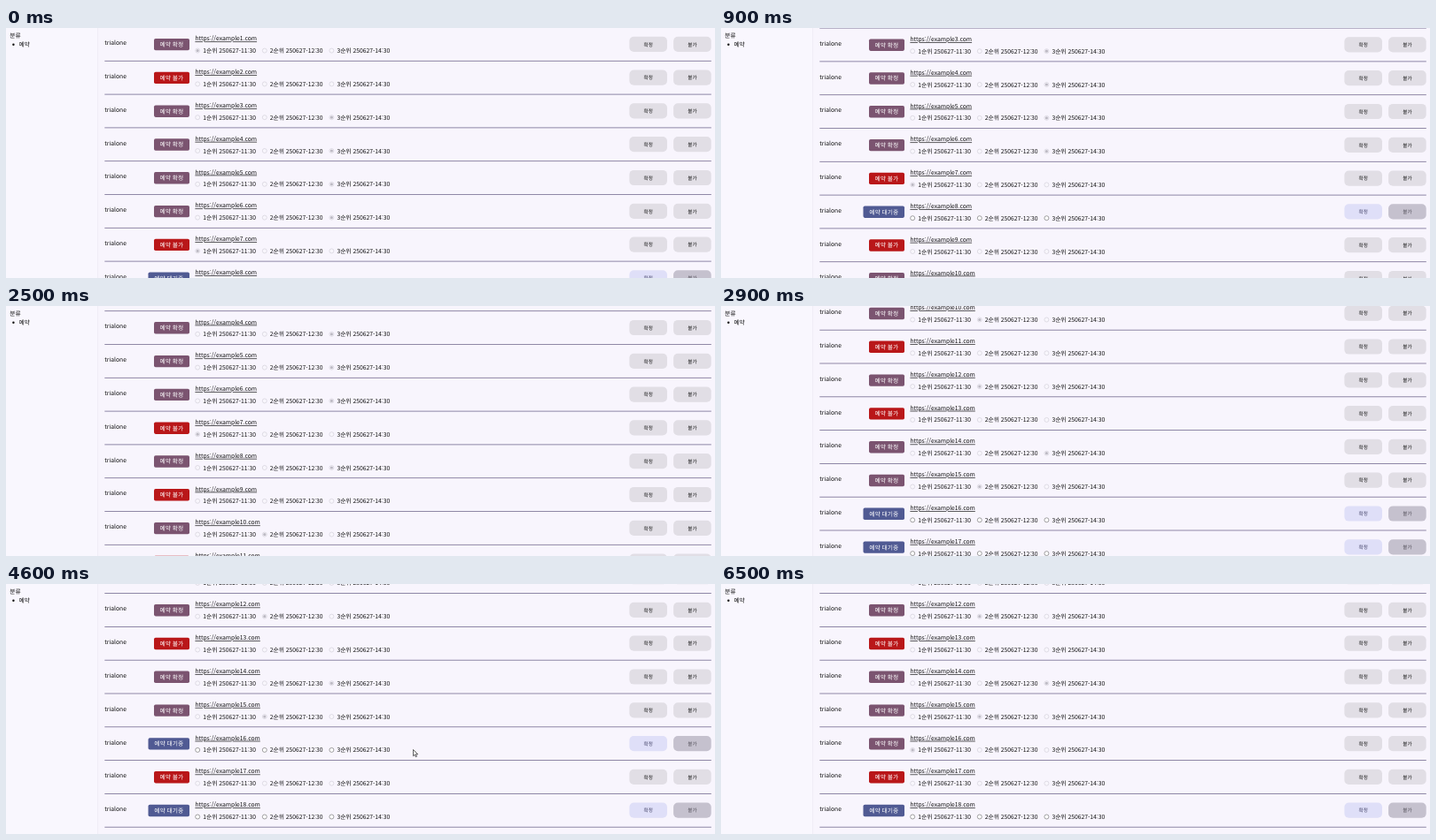
An HTML page for the animation above (6700 ms loop, 800 by 283 pixels).

```html
<!DOCTYPE html>
<html lang="ko">
<head>
<meta charset="utf-8">
<title>예약</title>
<style>
  html, body { margin: 0; width: 100%; height: 100%; overflow: hidden; background: #f8f5fd; }
  svg { display: block; width: 800px; height: 283px; }
  text { font: 6.76px "Noto Sans CJK KR", "Noto Sans KR", sans-serif; fill: #111; text-rendering: geometricPrecision; white-space: pre; }
  .badge { fill: #fff; font-weight: 500; text-anchor: end; }
  .button { font-size: 5.64px; font-weight: 500; text-anchor: middle; }
</style>
</head>
<body>
<svg viewBox="0 0 800 283">
  <rect width="103" height="283" fill="#f9f7fe"/>
  <rect x="103" width="1" height="283" fill="#f0edf6"/>
  <text x="4.2" y="10.7">분류</text>
  <circle cx="8.4" cy="18.8" r="1.2" fill="#111"/>
  <text x="14.4" y="21">예약</text>
  <g id="list"></g>
  <path id="cursor" d="M0 0V7.2L1.7 5.7L2.8 8.2L4 7.7L2.9 5.2H5.2Z" fill="#fff" stroke="#222" stroke-width=".7"/>
</svg>
<script>
const LOOP = 6700, STEP = 100, PITCH = 37.8;
const USER = 'trialone';
const list = document.getElementById('list');
const cursor = document.getElementById('cursor');

const STATES = {
  c: { label: '예약 확정', color: '#7b5470', width: 40 },
  r: { label: '예약 불가', color: '#b91719', width: 40 },
  p: { label: '예약 대기중', color: '#505a93', width: 46.5 }
};
const SLOTS = ['1순위 250627-11:30', '2순위 250627-12:30', '3순위 250627-14:30'];

// One entry per row: state letter and chosen slot (0 = none).
const ROWS = 'c1 r0 c3 c3 c3 c3 r1 p0 r0 c2 r0 c2 r0 c3 c2 p0 p0 p0'.split(' ');
// [time, row, new entry]
const CLICKS = [
  [1600, 8, 'p3'], [2000, 8, 'c3'],
  [4100, 17, 'r0'],
  [5000, 16, 'p1'], [5600, 16, 'c1']
];
const SCROLL = [[300, 0], [900, 75], [1200, 107.2], [2500, 107.2], [2900, 350.3], [3100, 404.7]];
const PATHS = [
  [[1200, 430, 232], [1500, 367, 182], [1600, 367, 182], [1900, 728, 175], [2200, 728, 175]],
  [[3200, 306.5, 207.5], [3400, 306.5, 207.5], [3900, 772, 216], [4100, 772, 216],
   [4600, 459.5, 187.5], [4900, 216, 187], [5100, 216, 187], [5500, 724, 179],
   [5700, 724, 179], [6200, 600, -10]]
];

// Linear interpolation through [time, ...values] keys.
function track(keys, t) {
  if (t <= keys[0][0]) return keys[0].slice(1);
  for (let i = 1; i < keys.length; i++) {
    const a = keys[i - 1], b = keys[i];
    if (t <= b[0]) {
      const k = (t - a[0]) / (b[0] - a[0]);
      return a.slice(1).map((v, j) => v + (b[j + 1] - v) * k);
    }
  }
  return keys[keys.length - 1].slice(1);
}

function radio(i, chosen, active) {
  const x = 216.2 + i * 75.6;
  const ring = active ? (chosen ? '#0075ff' : '#666') : '#cfccd5';
  const dot = active ? '#0075ff' : '#bdbac4';
  return `<circle cx="${x}" cy="25.6" r="2.5" fill="${active ? '#fff' : '#f8f6fc'}" stroke="${ring}" stroke-width=".6"/>` +
    (chosen ? `<circle cx="${x}" cy="25.6" r="1.6" fill="${dot}"/>` : '') +
    `<text x="${x + 6}" y="28.2">${SLOTS[i]}</text>`;
}

function button(x, label, fill, color) {
  return `<rect x="${x}" y="9.7" width="42.6" height="17.2" rx="5" fill="${fill}"/>` +
    `<text class="button" x="${x + 21.3}" y="20.5" style="fill:${color}">${label}</text>`;
}

function row(entry, i) {
  const { label, color, width } = STATES[entry[0]];
  const active = entry[0] === 'p';
  return `<g transform="translate(0 ${i * PITCH})">
    <text x="111.3" y="19.3">${USER}</text>
    <rect x="${207 - width}" y="11.9" width="${width}" height="13.4" rx="1.8" fill="${color}"/>
    <text class="badge" x="200.2" y="21.1">${label}</text>
    <text x="213.4" y="14.4" text-decoration="underline">https://example${i + 1}.com</text>
    ${SLOTS.map((_, j) => radio(j, +entry[1] === j + 1, active)).join('')}
    ${button(703.4, '확정', active ? '#dfdff8' : '#e1dee5', active ? '#45456a' : '#161616')}
    ${button(753.1, '불가', active ? '#c5c1ce' : '#e1dee5', active ? '#55525c' : '#161616')}
    <rect x="111.3" y="36.9" width="684.5" height=".8" fill="#756c91"/>
  </g>`;
}

function draw(t) {
  const rows = ROWS.slice();
  for (const [time, n, entry] of CLICKS) if (t >= time) rows[n - 1] = entry;
  list.setAttribute('transform', `translate(0 ${-track(SCROLL, t)[0]})`);
  list.innerHTML = rows.map(row).join('');

  const path = PATHS.find(p => t >= p[0][0] && t <= p[p.length - 1][0]);
  cursor.style.display = path ? '' : 'none';
  if (path) cursor.setAttribute('transform', `translate(${track(path, t)})`);
}

let last = -1;
function tick() {
  const t = Math.min(Math.floor(performance.now() % LOOP / STEP) * STEP, 6500);
  if (t !== last) draw(last = t);
  requestAnimationFrame(tick);
}
tick();
</script>
</body>
</html>
```
